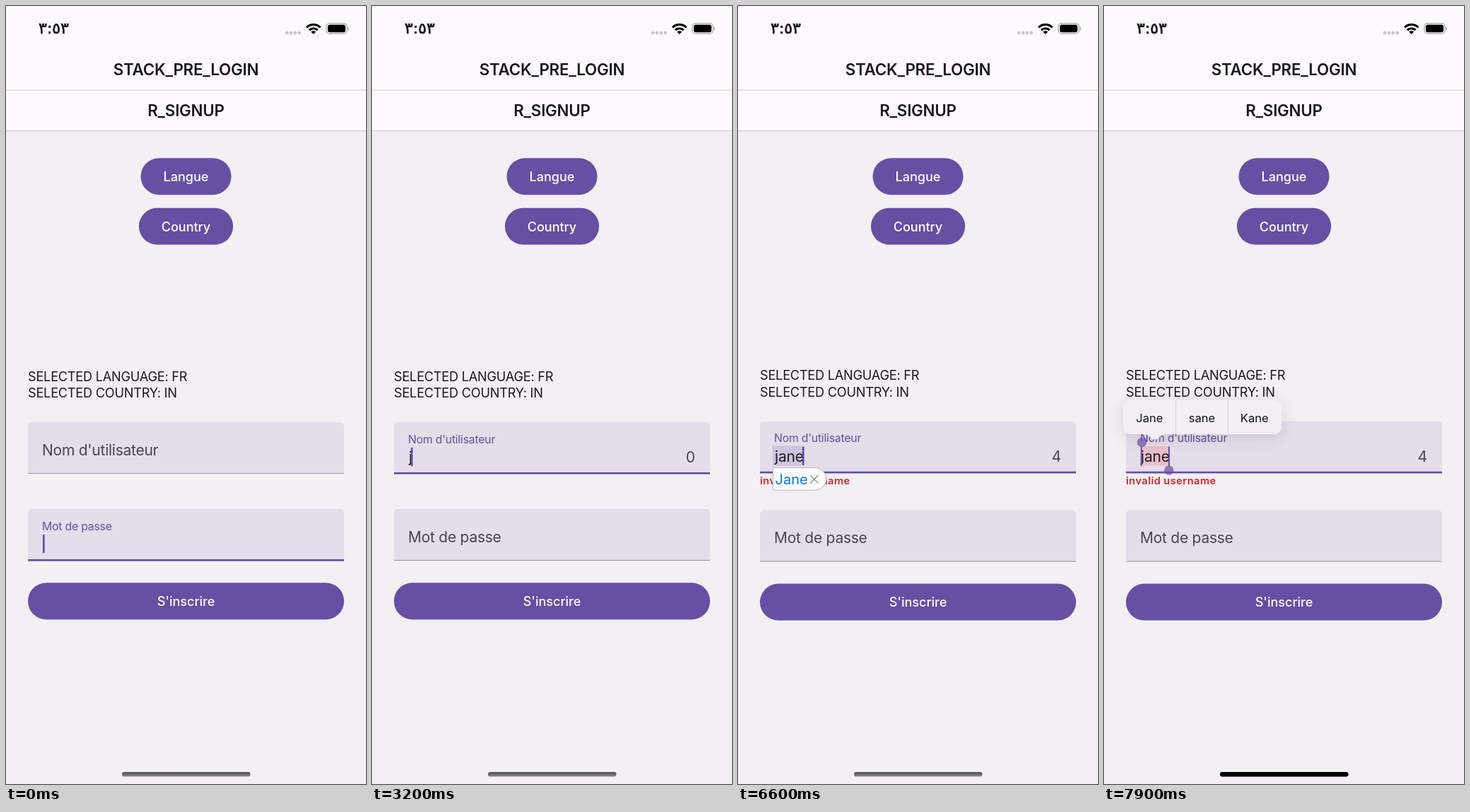
An HTML page that plays this animation: 509 px wide and 1101 px high, repeating every 8000 ms.

```html
<!DOCTYPE html>
<html lang="fr">
<head>
<meta charset="utf-8">
<title>Inscription</title>
<style>
  html, body { margin: 0; width: 100%; height: 100%; overflow: hidden; background: #f2f0f3; }
  svg { display: block; width: 100vw; height: 100vh; }
  text { font-family: Inter, Roboto, sans-serif; white-space: pre; }
  .mid { text-anchor: middle; }
  .time { font: 22px "DejaVu Sans", sans-serif; fill: #16141a; stroke: #16141a; stroke-width: .7; }
  .title { font-size: 22.3px; font-weight: 600; letter-spacing: -.2px; fill: #1a181d; }
  .btn { fill: #674fa3; }
  .btnText { font-size: 18px; font-weight: 500; fill: #fff; }
  .info { font-size: 18.2px; letter-spacing: -.25px; fill: #1b191e; }
  .label { font-size: 21px; letter-spacing: -.25px; }
  .value { font-size: 21px; letter-spacing: -.15px; fill: #1d1a20; }
  .count { font-size: 21px; fill: #49454f; text-anchor: end; }
  .error { font-size: 14.6px; font-weight: 600; letter-spacing: .45px; fill: #d3262d; }
  .hint { font-size: 20px; fill: #0b78e0; }
  .choice { font-size: 16.5px; fill: #161518; text-anchor: middle; }
</style>
</head>
<body>
<svg viewBox="0 0 509 1101" preserveAspectRatio="none">
  <defs>
    <linearGradient id="barGrey" x1="0" y1="0" x2="0" y2="1">
      <stop offset="0" stop-color="#4e4d50"/>
      <stop offset="1" stop-color="#89878b"/>
    </linearGradient>
    <filter id="shadow" x="-30%" y="-80%" width="160%" height="280%">
      <feDropShadow dx="0" dy="4" stdDeviation="11" flood-color="#000" flood-opacity=".12"/>
    </filter>
  </defs>

  <rect width="509" height="1101" fill="#f2f0f3"/>
  <rect width="509" height="176" fill="#fefbff"/>
  <rect y="118.6" width="509" height="1.2" fill="#d6d4d9"/>
  <rect y="176" width="509" height="1.2" fill="#cbc9ce"/>

  <text class="time mid" x="67.5" y="39">٣:٥٣</text>
  <path d="M397 38h18" stroke="#c9c6cc" stroke-width="4.8" stroke-linecap="round" stroke-dasharray="0 5.9"/>
  <g fill="none" stroke="#000" stroke-width="3.1">
    <path d="M425 30.3a13.8 13.8 0 0 1 19.4 0"/>
    <path d="M428.8 34.2a8.3 8.3 0 0 1 11.8 0"/>
  </g>
  <path d="M431.3 36.6a4.8 4.8 0 0 1 6.8 0l-3.4 3.5z"/>
  <rect x="453" y="24.6" width="29" height="14.6" rx="4.4" fill="none" stroke="#a4a2a6" stroke-width="1.3"/>
  <rect x="455" y="26.6" width="25" height="10.6" rx="2.7"/>
  <path d="M483.4 29.4a2.7 2.7 0 0 1 0 5z" fill="#a4a2a6"/>

  <text class="title mid" x="254.5" y="98">STACK_PRE_LOGIN</text>
  <text class="title mid" x="254.5" y="155.5">R_SIGNUP</text>
  <g id="picks"></g>

  <g id="upper">
    <text class="info" x="31" y="530.7">SELECTED LANGUAGE: FR</text>
    <text class="info" x="31" y="554">SELECTED COUNTRY: IN</text>
    <g id="user" transform="translate(0 589)"></g>
  </g>
  <g id="lower">
    <g id="pass" transform="translate(0 712)"></g>
    <g id="submit"></g>
  </g>

  <text id="error" class="error" x="31" y="677">invalid username</text>
  <g id="hint">
    <path d="M49.5 653.5H109a15.8 15.8 0 0 1 0 31.6H49.5z" fill="#fff" stroke="#bab8bd"/>
    <text class="hint" x="52.5" y="676.5">Jane</text>
    <path d="M102 664l11.5 11.5m0-11.5l-11.5 11.5" stroke="#8b898e" stroke-width="1.2"/>
  </g>

  <g id="menu">
    <g fill="#f2f0f3" filter="url(#shadow)">
      <rect x="27" y="558" width="224" height="48" rx="11"/>
      <path d="M58 606c6 0 9 7.5 14 7.5s8-7.5 14-7.5z"/>
    </g>
    <g id="choices"></g>
  </g>
  <g id="grips" fill="#674fa3">
    <path d="M52.8 623.5v27.5m39.2 0v-27.5" stroke="#674fa3" stroke-width="2"/>
    <circle cx="53.5" cy="617.5" r="6.8" opacity=".7"/>
    <circle cx="91.8" cy="657" r="6.8" opacity=".7"/>
  </g>

  <rect x="164" y="1084" width="181.5" height="6.5" rx="3.25" fill="url(#barGrey)"/>
  <rect id="barBlack" x="164" y="1084" width="181.5" height="6.5" rx="3.25"/>
</svg>

<script>
const LOOP = 8000, STEP = 100;
const PURPLE = '#674fa3', GREY = '#49454f';
const WORD = 'jane';
const FOCUS = 1400, TYPE = 3200, TYPED = 3600, SELECT = 7300;

const $ = id => document.getElementById(id);
const clamp = (v, lo = 0, hi = 1) => Math.min(hi, Math.max(lo, v));
const ramp = (t, from, to) => clamp((t - from) / (to - from));
const smooth = p => p * p * (3 - 2 * p);

function set(el, attrs) {
  for (const key in attrs) el.setAttribute(key, attrs[key]);
}

function pill(y, width, text) {
  return `<rect class="btn" x="${254.5 - width / 2}" y="${y}" width="${width}" height="52" rx="26"/>
    <text class="btnText mid" x="254.5" y="${y + 32.7}">${text}</text>`;
}

function makeField(id, name) {
  const root = $(id);
  root.innerHTML = `
    <path d="M31 73V5.5a5.5 5.5 0 0 1 5.5-5.5H472.5a5.5 5.5 0 0 1 5.5 5.5V73z" fill="#e5ddea"/>
    <rect class="line" x="31" width="447"/>
    <rect class="mark" x="49" y="34.7" width="43" height="28" fill="#cec4df" opacity="0"/>
    <rect class="pink" x="52" y="35.2" width="40" height="27.5" fill="#edb7c1" opacity="0"/>
    <text class="label">${name}</text>
    <text class="value" x="52" y="57"></text>
    <text class="count" x="457" y="57.3"></text>
    <rect class="caret" y="35.8" width="2.7" height="26.5" rx="1" fill="${PURPLE}"/>`;
  const parts = {};
  for (const el of root.querySelectorAll('[class]')) parts[el.getAttribute('class')] = el;
  return parts;
}

$('picks').innerHTML = pill(215.2, 128, 'Langue') + pill(285.8, 133.2, 'Country');
$('submit').innerHTML = pill(816.2, 447, "S'inscrire");
$('choices').innerHTML = ['Jane', 'sane', 'Kane'].map((word, i) => `
  <text class="choice" x="${64.3 + 74.2 * i}" y="588.5">${word}</text>
  ${i ? `<path d="M${27.5 + 74 * i} 558v48" stroke="#d9d7db"/>` : ''}`).join('');
const user = makeField('user', "Nom d'utilisateur");
const pass = makeField('pass', 'Mot de passe');

// Caret opacity: a one-second wave, on for two thirds, restarted by focus and typing.
function blink(t) {
  if (t >= SELECT) return 0;
  const peak = t < FOCUS ? 210 : t < TYPE ? 1620 : 3835;
  const time = t < TYPE ? t : Math.max(t, TYPED);
  return clamp(.5 + 1.3 * (.5 + Math.cos((time - peak) / 1000 * 2 * Math.PI)));
}

const typed = t => clamp(Math.floor((t - TYPE) / STEP) + 1, 0, WORD.length);

// Damped swing around full size.
function spring(ms) {
  return ms <= 0 ? 0 : 1 - Math.exp(-ms * .00605) * Math.cos(ms * Math.PI / 400);
}

function drawField(f, lift, active, alpha) {
  set(f.label, {
    transform: `translate(51 ${46.5 - 17 * lift}) scale(${1 - .25 * lift})`,
    fill: active ? PURPLE : GREY
  });
  set(f.line, active
    ? { y: 70.9, height: 2.7, fill: PURPLE }
    : { y: 72, height: 1, fill: '#9b93a3' });
  set(f.caret, {
    x: Math.max(52, 50 + f.value.getComputedTextLength()),
    opacity: active ? alpha : 0
  });
}

function draw(t) {
  const onUser = t >= FOCUS;
  const lift = smooth(ramp(t, FOCUS - 50, FOCUS + 150));
  const count = typed(t - STEP);
  const invalid = count > 0;
  const hint = ramp(t, 3700, 3800) - ramp(t, 6700, 6900);
  const grips = ramp(t, 7700, 7900);

  user.value.textContent = WORD.slice(0, typed(t));
  user.count.textContent = onUser ? count : '';
  drawField(user, lift, onUser, blink(t));
  drawField(pass, 1 - lift, !onUser, blink(t));
  set(user.mark, { opacity: hint });
  set(user.pink, { opacity: ramp(t, SELECT - STEP, SELECT) - .2 * grips });

  // The error line makes the centred form a little taller.
  set($('upper'), { transform: `translate(0 ${invalid ? -1.2 : 0})` });
  set($('lower'), { transform: `translate(0 ${invalid ? 1.4 : 0})` });
  set($('error'), { opacity: invalid ? 1 : 0 });
  set($('hint'), { opacity: hint });

  set($('menu'), {
    opacity: ramp(t, SELECT, SELECT + 200),
    transform: `translate(72 614) scale(${spring(t - SELECT)}) translate(-72 -614)`
  });
  set($('grips'), { opacity: grips });
  set($('barBlack'), { opacity: ramp(t, 7000, 7400) });
}

const start = performance.now();
function tick() {
  const t = (performance.now() - start) % LOOP;
  draw(Math.floor(t / STEP) * STEP);
  requestAnimationFrame(tick);
}
tick();
</script>
</body>
</html>
```
